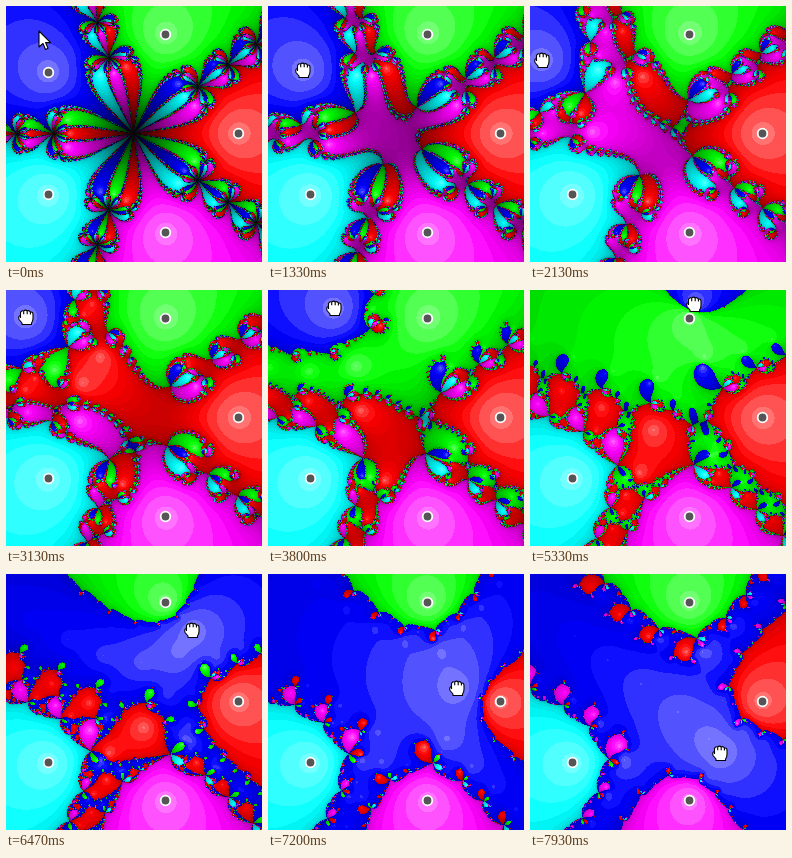
Animation of 256x256 px, one loop 8 s. Source, as an HTML page with a canvas:

```html
<!DOCTYPE html>
<html lang="en">
<head>
<meta charset="utf-8">
<title>Newton fractal with a moving root</title>
<style>
  html, body { margin: 0; width: 100%; height: 100%; overflow: hidden; background: #000; }
  canvas { display: block; width: 256px; height: 256px; }
</style>
</head>
<body>
<canvas id="stage" width="256" height="256"></canvas>
<script>
const SIZE = 256, LOOP = 8000, STEP = 1000 / 15;
const CENTER = 127, RADIUS = 104.6;
const TOL = 0.001, MAX_ITER = 60;
const BLUE = 2;
const DRAG_START = 14;

const ctx = document.getElementById('stage').getContext('2d');

// Five roots of unity in pixel coordinates, counter-clockwise from the right
const rest = [0, 1, 2, 3, 4].map(i => {
  const a = i * Math.PI * 2 / 5;
  return [CENTER + RADIUS * Math.cos(a), CENTER - RADIUS * Math.sin(a)];
});
const hues = [[1, 0, 0], [0, 1, 0], [0, 0, 1], [0, 1, 1], [1, 0, 1]];

// Drag path: step, x, y
const path = [
  [DRAG_START, ...rest[BLUE]],
  [32, 12, 54],
  [47, 20, 27],
  [66, 113, 14],
  [80, 164, 14],
  [97, 186, 56],
  [119, 190, 179]
];

// Tints near a root, then a slow decay towards black
function shade(n) {
  if (n < 6) return [0.55, 0.55, 0.45, 0.32, 0.19, 0.06][n];
  return 0.955 ** (n - 5) - 1;
}

const palette = hues.map(hue => Array.from({ length: MAX_ITER + 1 }, (_, n) => {
  const s = shade(n);
  return hue.map(c => Math.round(255 * (s > 0 ? Math.max(c, s) : c * (1 + s))));
}));

function slope(i, axis) {
  if (i === 0) return 0;
  const a = path[i - 1], b = path[Math.min(i + 1, path.length - 1)];
  return (b[axis] - a[axis]) / (b[0] - a[0]);
}

function dragPoint(k) {
  if (k <= DRAG_START) return rest[BLUE];
  let i = 0;
  while (i < path.length - 2 && k > path[i + 1][0]) i++;
  const a = path[i], b = path[i + 1], span = b[0] - a[0];
  const u = (k - a[0]) / span, v = 1 - u;
  return [1, 2].map(axis =>
    v * v * (1 + 2 * u) * a[axis] + u * u * (3 - 2 * u) * b[axis] +
    span * u * v * (v * slope(i, axis) - u * slope(i + 1, axis)));
}

// Coefficients of the monic polynomial, highest power first
function expand(roots) {
  let re = [1], im = [0];
  for (const [rx, ry] of roots) {
    const n = re.length, nr = [...re, 0], ni = [...im, 0];
    for (let i = 0; i < n; i++) {
      nr[i + 1] -= re[i] * rx - im[i] * ry;
      ni[i + 1] -= re[i] * ry + im[i] * rx;
    }
    re = nr;
    im = ni;
  }
  return [re, im];
}

function nearest(roots, x, y) {
  let best = 0, min = Infinity;
  roots.forEach(([rx, ry], i) => {
    const d = (x - rx) ** 2 + (y - ry) ** 2;
    if (d < min) { min = d; best = i; }
  });
  return best;
}

function fractal(points) {
  const roots = points.map(([x, y]) => [(x - CENTER) / RADIUS, (y - CENTER) / RADIUS]);
  const [re, im] = expand(roots);
  const image = new ImageData(SIZE, SIZE), data = image.data;
  let p = 0;
  for (let py = 0; py < SIZE; py++) {
    for (let px = 0; px < SIZE; px++) {
      let x = (px - CENTER) / RADIUS, y = (py - CENTER) / RADIUS, n = 0;
      for (; n < MAX_ITER; n++) {
        let fr = 1, fi = 0, dr = 0, di = 0, t;
        for (let j = 1; j < 6; j++) {
          t = dr * x - di * y + fr;
          di = dr * y + di * x + fi;
          dr = t;
          t = fr * x - fi * y + re[j];
          fi = fr * y + fi * x + im[j];
          fr = t;
        }
        const m = dr * dr + di * di;
        const sx = (fr * dr + fi * di) / m, sy = (fi * dr - fr * di) / m;
        x -= sx;
        y -= sy;
        if (sx * sx + sy * sy < TOL * TOL) break;
      }
      const c = palette[nearest(roots, x, y)][n];
      data[p++] = c[0];
      data[p++] = c[1];
      data[p++] = c[2];
      data[p++] = 255;
    }
  }
  return image;
}

const arrow = new Path2D('M0 0V16L4 12.5L6.5 18.5L9 17.3L6.6 11.6H11.5Z');
const hand = new Path2D('M-4 7.5V6L-7 2.5Q-8-1-5.5-1.5V-4.5Q-4.5-7-2.3-5.8Q-.5-7.8 1.2-6' +
  'Q3.2-7 4.4-5Q7-5.5 7-2.5V1.5Q7 4 5.5 6V7.5Z');
const fingers = new Path2D('M-5.5-1.5V1M-2.3-5.5V-2.8M1.2-5.8V-2.8M4.4-5V-2.5');

function drawCursor(x, y, shape, lines) {
  ctx.save();
  ctx.translate(Math.round(x), Math.round(y));
  ctx.fillStyle = '#fff';
  ctx.strokeStyle = '#000';
  ctx.lineWidth = 1.1;
  ctx.lineJoin = 'round';
  ctx.fill(shape);
  ctx.stroke(shape);
  if (lines) ctx.stroke(lines);
  ctx.restore();
}

function drawMarker([x, y]) {
  ctx.beginPath();
  ctx.arc(Math.round(x) + 0.5, Math.round(y) + 0.5, 4.8, 0, Math.PI * 2);
  ctx.fillStyle = '#555';
  ctx.fill();
  ctx.strokeStyle = '#fff';
  ctx.lineWidth = 1.8;
  ctx.stroke();
}

const cache = new Map();

function draw(k) {
  const blue = dragPoint(k);
  const points = rest.map((r, i) => i === BLUE ? blue : r);
  const key = Math.max(k, DRAG_START);
  if (!cache.has(key)) cache.set(key, fractal(points));
  ctx.putImageData(cache.get(key), 0, 0);
  points.forEach((point, i) => {
    if (i !== BLUE || k <= DRAG_START) drawMarker(point);
  });
  if (k > DRAG_START) {
    drawCursor(...blue, hand, fingers);
  } else {
    const u = Math.min(1, Math.max(0, (k - 1) / 9));
    const e = u * u * (3 - 2 * u);
    drawCursor(33 + 8 * e, 25 + 36 * e, arrow);
  }
}

const start = performance.now();
let shown = -1;

function tick() {
  const t = (performance.now() - start) % LOOP;
  // Steps begin on the nearest 10 ms, so allow for the rounding
  const k = Math.floor((t + 3.5) / STEP) % 120;
  if (k !== shown) draw(shown = k);
  requestAnimationFrame(tick);
}
tick();
</script>
</body>
</html>
```
